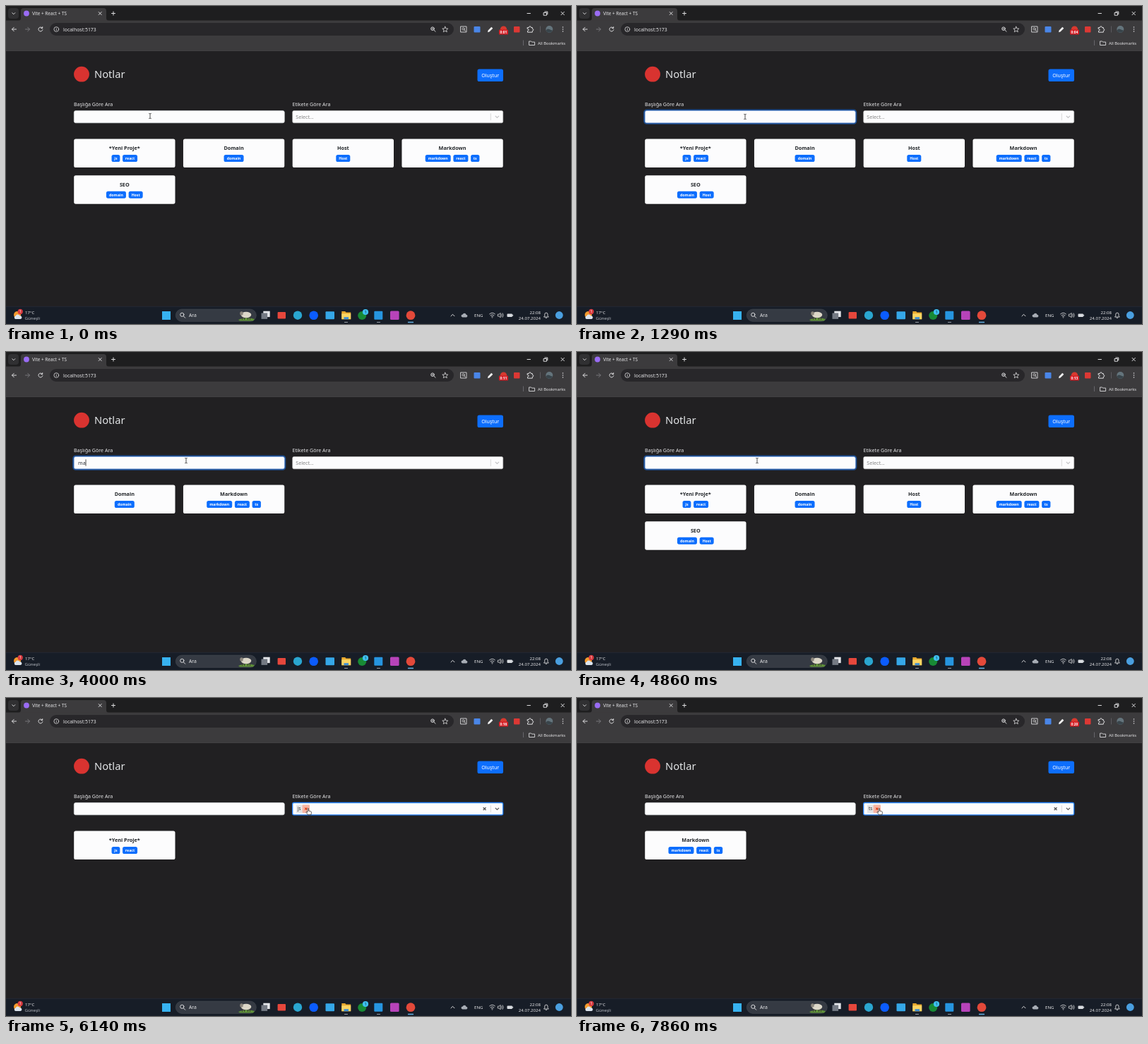
An HTML page that plays this animation: 800 px wide and 451 px high, repeating every 8 s.

```html
<!DOCTYPE html>
<html lang="tr">
<head>
<meta charset="utf-8">
<title>Notlar</title>
<style>
html, body { margin: 0; width: 100%; height: 100%; overflow: hidden; background: #212022; }
svg { display: block; width: 100%; height: 100%; }
text { font: 7.1px "Noto Sans", "Open Sans", sans-serif; fill: #e6e6e8; white-space: pre; }
.mid { text-anchor: middle; }
.end { text-anchor: end; }
.title { font-size: 7.25px; font-weight: 600; fill: #212529; }
.tag { font-size: 5.2px; font-weight: 700; fill: #fff; }
.line { fill: none; stroke: #dcdcde; stroke-width: 1; stroke-linecap: round; stroke-linejoin: round; }
.task { font-size: 6.1px; }
</style>
</head>
<body>
<svg viewBox="0 0 800 451" preserveAspectRatio="none">
  <rect width="800" height="451" fill="#212022"/>

  <!-- tab strip -->
  <rect width="800" height="21" fill="#1e1e1f"/>
  <rect x="3" y="3" width="15" height="15" rx="4" fill="#303032"/>
  <path class="line" d="M8.8 9.7l2 2 2-2"/>
  <path d="M17 21q4 0 4-4V7q0-4 4-4h113q4 0 4 4v10q0 4 4 4z" fill="#3c3b3d"/>
  <circle cx="29" cy="10.5" r="3.9" fill="#9a6cf5"/>
  <text x="37" y="13" style="font-size:6.4px">Vite + React + TS</text>
  <path class="line" d="M131.2 8.5l4 4m0-4l-4 4M149.5 10.5h5m-2.5-2.5v5M738 10.5h4.5M786 8.3l4.4 4.4m0-4.4l-4.4 4.4"/>
  <path class="line" stroke-width=".8" d="M761.5 9.5h4v3.7h-4zM762.8 8h4v3.8"/>

  <!-- toolbar -->
  <rect y="20.5" width="800" height="43" fill="#3c3b3d"/>
  <rect x="62" y="24" width="572" height="18" rx="9" fill="#28272a"/>
  <path class="line" d="M14.5 33h-6m2.8-2.8L8.5 33l2.8 2.8"/>
  <path class="line" style="stroke:#77767a" d="M27.5 33h6m-2.8-2.8l2.8 2.8-2.8 2.8"/>
  <path class="line" d="M51.4 31.2a3 3 0 1 0 .5 2.5M51.7 29.6v2h-2"/>
  <circle cx="71.3" cy="33" r="3.4" class="line" style="stroke-width:.8"/>
  <path class="line" style="stroke-width:.8" d="M71.3 32.8v1.8M71.3 31.2v.1"/>
  <text x="81" y="35.6" style="font-size:6.9px">localhost:5173</text>
  <circle cx="604" cy="32.2" r="2.3" class="line"/>
  <path class="line" d="M605.8 34l2.3 2.3M603 32.2h2"/>
  <path class="line" style="stroke-width:.8" d="M621.8 29.2l1.1 2.7 2.9.2-2.2 1.9.7 2.8-2.5-1.5-2.5 1.5.7-2.8-2.2-1.9 2.9-.2z"/>
  <rect x="644" y="29" width="8" height="8" class="line" style="stroke-width:.9"/>
  <circle cx="647.6" cy="32.5" r="1.6" class="line" style="stroke-width:.8"/>
  <path class="line" d="M648.8 33.8l1.5 1.5"/>
  <rect x="662.5" y="29" width="9" height="8.5" rx="1" fill="#4a86e8"/>
  <path d="M682 37.3l.7-2.7 4.6-4.8 2 2-4.8 4.7z" fill="#f4f4f4"/>
  <circle cx="704.5" cy="33" r="4.6" fill="#d8392f"/>
  <rect x="698" y="33.4" width="13" height="7" rx="1.2" fill="#d51f26"/>
  <text id="timer" class="mid" x="704.5" y="38.8" style="font-size:4.9px;font-weight:700;fill:#fff"></text>
  <rect x="719" y="29" width="8.5" height="8.5" rx="1" fill="#dc3834"/>
  <path class="line" d="M738.5 30.5h2q0-1.7 1.4-1.7t1.4 1.7h2v2q1.5 0 1.5 1.3t-1.5 1.3v2.1h-6.8v-2q1.7-.1 1.7-1.4t-1.7-1.4z"/>
  <path d="M756.5 28.5v9" stroke="#5b5a5f"/>
  <circle cx="769.3" cy="33" r="5" fill="#64747c"/>
  <path d="M764.6 34.5q2-3 4.7-1.5t4.7 1.4a5 5 0 0 1-9.4.1" fill="#39454b"/>
  <g fill="#dcdcde"><circle cx="788.5" cy="30" r=".8"/><circle cx="788.5" cy="33" r=".8"/><circle cx="788.5" cy="36" r=".8"/></g>
  <path d="M732.5 48.5v7.5" stroke="#67666b"/>
  <path class="line" style="stroke-width:.9" d="M741 50h2.6l1 1.1h4v4.4H741z"/>
  <text x="753" y="54.5" style="font-size:5.8px">All Bookmarks</text>
  <path d="M0 63.5h800" stroke="#4a494c" stroke-width=".7"/>

  <!-- page -->
  <circle cx="107" cy="96.7" r="10.9" fill="#d93330"/>
  <text x="125" y="102.2" style="font-size:14.7px;font-weight:500;fill:#e4e6e8">Notlar</text>
  <rect x="667.5" y="89.5" width="36.5" height="17.5" rx="2.6" fill="#0d6efd"/>
  <text class="mid" x="685.7" y="100.8" style="fill:#fff">Oluştur</text>
  <text x="96" y="141.6">Başlığa Göre Ara</text>
  <text x="405.5" y="141.6">Etikete Göre Ara</text>
  <rect id="ring" x="95.2" y="147.4" width="300.1" height="19.4" rx="3.6" fill="none" stroke="#1c4d91" stroke-width="2"/>
  <rect id="field" x="96.3" y="148.5" width="298" height="17.3" rx="2.5" fill="#fcfcfd" stroke-width=".6"/>
  <text id="typed" x="102" y="159.6" style="fill:#333840"></text>
  <path id="caret" stroke="#222" stroke-width=".8"/>
  <rect id="select" x="405.7" y="148.5" width="298" height="17.3" rx="2" fill="#fcfcfd"/>
  <text id="hint" x="410.3" y="159.6" style="fill:#858585">Select...</text>
  <g id="chip">
    <rect x="411" y="151.5" width="19" height="11.6" rx="1" fill="#e5e5e6"/>
    <text id="chipText" x="413" y="159.3" style="font-size:6.2px;fill:#333"></text>
    <rect id="drop" x="419.6" y="151.5" width="10.4" height="11.6" rx="1"/>
    <path id="dropX" d="M423.2 155.7l3 3m0-3l-3 3" stroke-width="1.1"/>
    <path d="M675.7 155.2l3.8 3.8m0-3.8l-3.8 3.8" stroke="#555" stroke-width="1.3"/>
  </g>
  <path d="M686.3 152.3v9.8" stroke="#c9c9cb" stroke-width=".7"/>
  <path id="chevron" d="M692.8 155.8l2.6 2.6 2.6-2.6" fill="none" stroke-width="1.2"/>
  <g id="cards"></g>

  <!-- taskbar -->
  <rect y="426" width="800" height="25" fill="#171d27"/>
  <path d="M0 426.3h800" stroke="#2d323b" stroke-width=".6"/>
  <circle cx="16" cy="438" r="5" fill="#f39a2d"/>
  <path d="M13.5 444a2.3 2.3 0 0 1 .2-4.5 3 3 0 0 1 5.6-.2 2.4 2.4 0 0 1 1.2 4.7z" fill="#dbe4ee"/>
  <circle cx="20.2" cy="433.4" r="3.6" fill="#d83a3f"/>
  <text class="mid" x="20.2" y="435.3" style="font-size:5px;fill:#fff">1</text>
  <text class="task" x="27" y="436.6">17°C</text>
  <text class="task" x="26.5" y="445" style="fill:#b9bdc4">Güneşli</text>
  <rect x="221" y="433" width="12" height="12" fill="#37b2f0"/>
  <rect x="240.3" y="430" width="114" height="17.4" rx="8.7" fill="#353a43" stroke="#454a53" stroke-width=".6"/>
  <circle cx="249.3" cy="437.8" r="2.6" class="line"/>
  <path class="line" d="M251.3 439.8l2.4 2.5"/>
  <text x="259" y="441.2" style="font-size:6.8px">Ara</text>
  <path d="M329 445q10-5 23-1l-2 2.4h-19z" fill="#5f9138"/>
  <path d="M334.5 440v5m3-4v4m5-4v4m3-5v5" stroke="#3d3935"/>
  <ellipse cx="340" cy="438" rx="7.3" ry="4.2" fill="#dcd7c8"/>
  <ellipse cx="333.5" cy="436" rx="2.3" ry="2.8" fill="#8d877d"/>
  <rect x="364.3" y="432.7" width="9.4" height="8.4" fill="#e4e6ea"/>
  <rect x="361.5" y="435.5" width="8.6" height="8.4" fill="#747a84"/>
  <rect x="384.6" y="434" width="11.4" height="9.4" rx="1" fill="#e5473c"/>
  <circle cx="413" cy="438.7" r="6.2" fill="#2aa6d0"/>
  <circle cx="435.7" cy="438.7" r="6.3" fill="#0b5cff"/>
  <rect x="452.5" y="433.3" width="12.5" height="11" rx="1" fill="#35a7e8"/>
  <path d="M475.3 433h4.8l1.4 1.6h6.7v9.6h-12.9z" fill="#e9a92e"/>
  <path d="M475.3 436.2h12.9v8h-12.9z" fill="#fbd565"/>
  <path d="M478.5 444.2v-3h6.5v3z" fill="#3b8fd6"/>
  <circle cx="504.2" cy="439" r="6" fill="#188a35"/>
  <circle cx="509" cy="434" r="4.1" fill="#3fc0ef"/>
  <text class="mid" x="509" y="436" style="font-size:5.4px;fill:#10202b">1</text>
  <rect x="521.3" y="432.7" width="12" height="12" rx="1" fill="#2695e0"/>
  <rect x="544" y="432.6" width="12.6" height="12.4" rx="1.5" fill="#b743ba"/>
  <circle cx="573" cy="438.7" r="6.4" fill="#e3493a"/>
  <path d="M479.5 448.5h4m42 0h4" stroke="#9aa0a8" stroke-width="1.2" stroke-linecap="round"/>
  <path d="M569.5 448.5h7" stroke="#66b5e8" stroke-width="1.3" stroke-linecap="round"/>
  <path class="line" d="M630 439.8l2.5-2.5 2.5 2.5"/>
  <path d="M646.5 441.4a2 2 0 0 1 .1-4 2.7 2.7 0 0 1 5 .3 1.9 1.9 0 0 1 .5 3.7z" fill="#a8adb5"/>
  <text class="task" x="663" y="441">ENG</text>
  <path class="line" style="stroke-width:.9" d="M684.7 436.8q3.8-3.3 7.6 0M686 438.8q2.5-2.2 5 0M687.4 440.6q1.1-1 2.2 0M688.5 442v.1"/>
  <path class="line" style="stroke-width:.8" d="M696.7 437.2h1.4l2-1.8v6.4l-2-1.8h-1.4zM701.7 437q1.3 1.5 0 3.2M703.2 435.8q2.3 2.8 0 5.6"/>
  <rect x="709.5" y="436.4" width="7.4" height="4.7" rx="1" fill="#d9dce0"/>
  <path d="M717.6 437.7v2" stroke="#d9dce0"/>
  <text class="task end" x="757" y="436.6">22:08</text>
  <text class="task end" x="757" y="445">24.07.2024</text>
  <path class="line" style="stroke-width:.9" d="M761.8 440.7l1-1.4v-2.1a2.1 2.1 0 0 1 4.2 0v2.1l1 1.4zM764.2 442.3h1.4"/>
  <circle cx="783.3" cy="438.5" r="5.4" fill="#4a9fe0"/>

  <!-- pointers -->
  <path id="beam" d="M-1.7-3.6Q0-3.6 0-2.8Q0-3.6 1.7-3.6M0-2.8V2.8M-1.7 3.6Q0 3.6 0 2.8Q0 3.6 1.7 3.6" fill="none" stroke="#222" stroke-width=".8"/>
  <path id="arrow" d="M0 0v9l2.1-1.9 1.4 3.1 1.4-.7-1.4-2.9h2.8z" fill="#fff" stroke="#222" stroke-width=".6"/>
  <path id="hand" d="M-1-4.2q.8-.7 1.5 0v3.3l3.2.8q.8.3.7 1.2L4 4.5H-.6L-3 1.3q-.3-1 .7-.9l1.3.8z" fill="#fff" stroke="#222" stroke-width=".7"/>
</svg>

<script>
const LOOP = 8000, FPS = 7, BLINK = 219;
const $ = id => document.getElementById(id);
const set = (id, attrs) => { for (const k in attrs) $(id).setAttribute(k, attrs[k]); };
const show = (id, on) => { $(id).style.display = on ? '' : 'none'; };
const put = (id, text) => { if ($(id).textContent !== text) $(id).textContent = text; };

const notes = [
  ['*Yeni Proje*', 'js', 'react'],
  ['Domain', 'domain'],
  ['Host', 'Host'],
  ['Markdown', 'markdown', 'react', 'ts'],
  ['SEO', 'domain', 'Host']
];
const tagWidth = { js: 11.8, react: 21, domain: 28, Host: 20, markdown: 36, ts: 12.3 };
const GAP = 3.7;

const typing = [[0, ''], [3140, 'm'], [3425, 'ma'], [4280, 'm'], [4425, '']];
const chosen = [[0, ''], [5710, 'js'], [6570, ''], [7425, 'ts']];
const FOCUS = 425, LEAVE = 5280;

// time, x, y
const path = [
  [0, 204, 156], [425, 204, 156], [1140, 238, 157], [1430, 238, 157], [2000, 255, 154],
  [4857, 255, 154], [5280, 470, 158], [5710, 470, 160], [6000, 428, 161],
  [6710, 428, 161], [7140, 446, 160], [7425, 446, 160], [7714, 428, 161], [LOOP, 428, 161]
];

const latest = (steps, t) => steps.filter(s => s[0] <= t).pop();

function pointerAt(t) {
  const i = path.findIndex(p => p[0] > t), [t0, x0, y0] = path[i - 1], [t1, x1, y1] = path[i];
  const u = (t - t0) / (t1 - t0), k = u * u * (3 - 2 * u);
  return [x0 + (x1 - x0) * k, y0 + (y1 - y0) * k];
}

function card([title, ...tags], i) {
  const x = 96.2 + i % 4 * 154.75, y = 188.5 + Math.floor(i / 4) * 51.7, mid = x + 71.6;
  let left = mid - (tags.reduce((sum, t) => sum + tagWidth[t] + GAP, -GAP)) / 2;
  const badges = tags.map(t => {
    const w = tagWidth[t], at = left;
    left += w + GAP;
    return `<rect x="${at}" y="${y + 22.5}" width="${w}" height="10" rx="2.6" fill="#0d6efd"/>
      <text class="tag mid" x="${at + w / 2}" y="${y + 29.3}">${t}</text>`;
  }).join('');
  return `<rect x="${x}" y="${y}" width="143.3" height="40.5" rx="2.6" fill="#fcfcfd"/>
    <text class="title mid" x="${mid}" y="${y + 15.8}">${title}</text>${badges}`;
}

let listKey;
function drawCards(query, tag) {
  const key = query + '|' + tag;
  if (key === listKey) return;
  listKey = key;
  $('cards').innerHTML = notes
    .filter(([title, ...tags]) => title.toLowerCase().includes(query) && (!tag || tags.includes(tag)))
    .map(card).join('');
}

function draw(t) {
  const [keyTime, query] = latest(typing, t), tag = latest(chosen, t)[1];
  const inField = t >= FOCUS && t < LEAVE, inSelect = t >= LEAVE;
  const [x, y] = pointerAt(t);

  put('timer', '0:' + String(Math.floor(1.5 + t * .00242)).padStart(2, '0'));
  drawCards(query, tag);

  show('ring', inField);
  set('field', { stroke: inField ? '#86b7fe' : '#dee2e6' });
  put('typed', query);
  const caretX = query ? 102.4 + $('typed').getComputedTextLength() : 102.8;
  set('caret', { d: `M${caretX} 152.3v9.4` });
  show('caret', inField && Math.floor((t - Math.max(FOCUS, keyTime)) / BLINK) % 2 === 0);

  set('select', { stroke: inSelect ? '#2684ff' : '#ccc', 'stroke-width': inSelect ? 1.3 : .6 });
  set('chevron', { stroke: inSelect ? '#555' : '#c4c4c6' });
  show('hint', !tag);
  show('chip', tag);
  put('chipText', tag);
  const hover = tag && x < 430;
  set('drop', { fill: hover ? '#f7b5a4' : '#e5e5e6' });
  set('dropX', { stroke: hover ? '#de350b' : '#444' });

  const shape = hover ? 'hand' : x > 396 ? 'arrow' : 'beam';
  for (const id of ['beam', 'arrow', 'hand']) show(id, id === shape);
  set(shape, { transform: `translate(${x} ${y})` });
}

function tick() {
  const step = Math.floor((performance.now() % LOOP + 5) * FPS / 1000) % (LOOP * FPS / 1000);
  draw(step * 1000 / FPS);
  requestAnimationFrame(tick);
}
tick();
</script>
</body>
</html>
```
